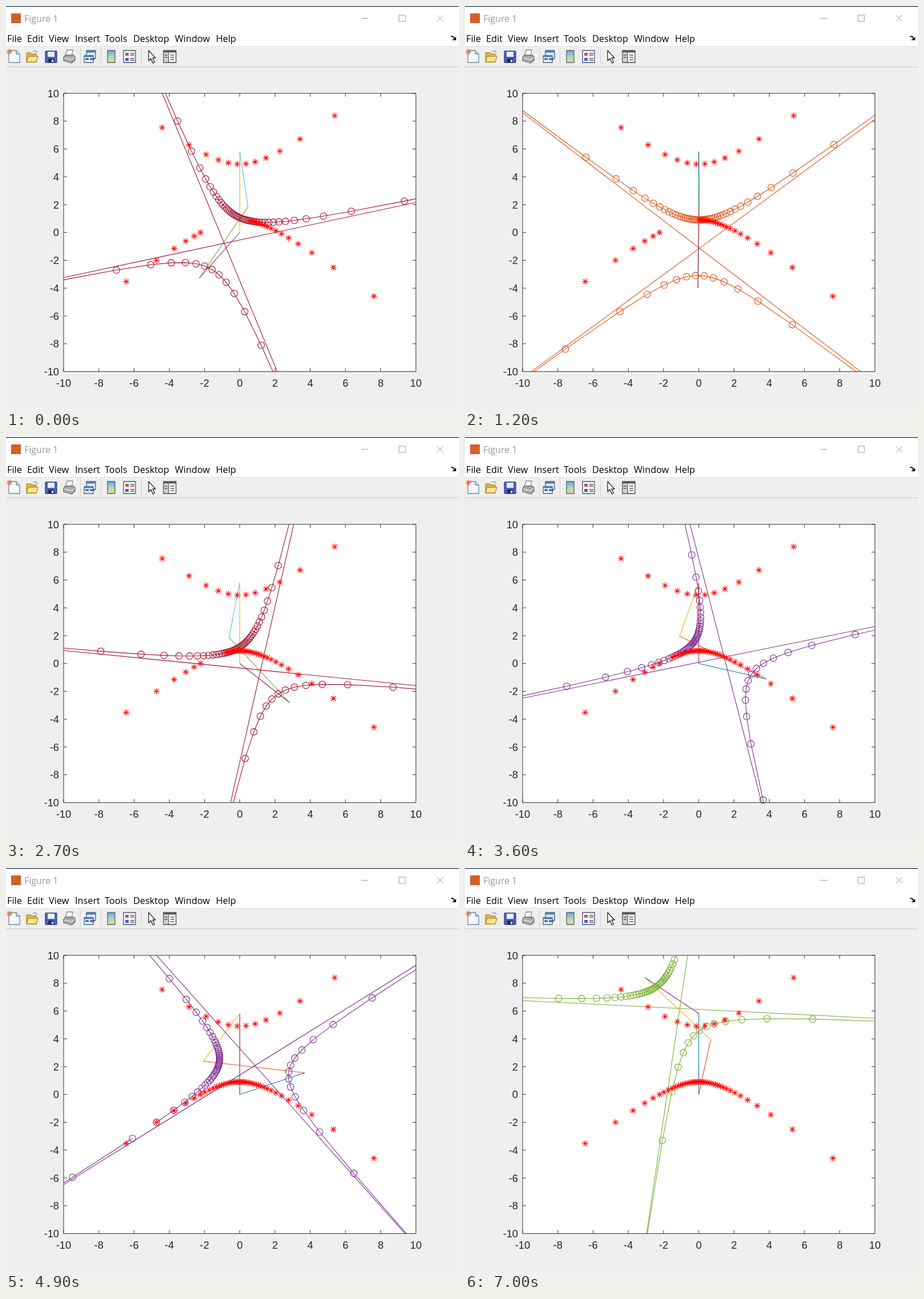
An HTML page that plays this animation: 794x706 px, repeating every 7100 ms.

```html
<!DOCTYPE html>
<html lang="en">
<head>
<meta charset="utf-8">
<title>Figure 1</title>
<style>
html, body { margin: 0; width: 100%; height: 100%; overflow: hidden; background: #efefef; }
svg { display: block; }
.ui { font: 16.3px "Open Sans", "Noto Sans", sans-serif; }
.tick { font: 18.3px "Liberation Sans", Arial, sans-serif; fill: #262626; }
.line { fill: none; stroke-width: 1.1; }
</style>
</head>
<body>
<svg width="794" height="706" viewBox="0 0 794 706">
  <defs>
    <clipPath id="box"><rect x="101" y="153" width="618" height="487.5"/></clipPath>
    <linearGradient id="map" x2="0" y2="1">
      <stop stop-color="#6fa5e0"/><stop offset=".5" stop-color="#a9d6c0"/><stop offset="1" stop-color="#f2dc78"/>
    </linearGradient>
  </defs>
  <rect width="794" height="706" fill="#efefef"/>
  <rect width="794" height="70" fill="#fff"/>
  <path d="M0 .5H794" stroke="#1c2c49" stroke-width="1.5"/>
  <path d="M0 70.5H794" stroke="#e2e2e2"/>
  <path d="M0 106.5H794" stroke="#c9c9c9"/>

  <!-- title bar -->
  <rect x="9" y="13" width="17" height="17" fill="#d2602a"/>
  <text class="ui" x="32" y="28" fill="#999" style="font-size:16px">Figure 1</text>
  <path d="M623 21.5H635M689 16H700V27H689ZM755.5 16L766.5 27M766.5 16L755.5 27" fill="none" stroke="#999"/>
  <g id="menu" class="ui"></g>
  <path d="M780 53C784 53 786 55 786 58" fill="none" stroke="#111" stroke-width="2"/>
  <path d="M789 54V60H782Z" fill="#111"/>

  <!-- toolbar -->
  <path d="M130.5 73V104M166.5 73V104M237.5 73V104" stroke="#d0d0d0"/>
  <g stroke-width="1.3" stroke-linejoin="round">
    <path d="M5 78H18L24 84V99H5Z" fill="#f3f8fd" stroke="#6c87a8"/>
    <path d="M18 78V84H24" fill="#c9dcf0" stroke="#6c87a8"/>
    <path d="M6 75V85M1 80H11M2.5 76.5L9.5 83.5M9.5 76.5L2.5 83.5" stroke="#e07b45" stroke-width="1.6"/>
    <path d="M36 98V82H43L45 84H53V98Z" fill="#e5b74d" stroke="#b58a2c"/>
    <path d="M36 98L39 88H56L53 98Z" fill="#ffe58e" stroke="#b58a2c"/>
    <path d="M47 80Q52 76 55 82" fill="none" stroke="#7d95b0"/>
    <rect x="69" y="79" width="20" height="20" rx="1" fill="#4a5fc0" stroke="#35418d"/>
    <path d="M73 80H85V89H73Z" fill="#e8effb"/>
    <path d="M74 92H84V99H74Z" fill="#222a55"/><path d="M80 94H83V98H80Z" fill="#eee"/>
    <path d="M104 88L107 77H117L115 88Z" fill="#fff" stroke="#8a8a8a"/>
    <path d="M101 90L104 86H118L121 89V95L115 100L101 96Z" fill="#a9a9a9" stroke="#6a6a6a"/>
    <path d="M102 91L115 94L120 90" fill="none" stroke="#e6e6e6"/>
    <rect x="141" y="78" width="16" height="14" fill="#dbe7f4" stroke="#466080"/>
    <path d="M141 80H157" stroke="#4f79ad" stroke-width="3"/>
    <rect x="137" y="87" width="16" height="12" fill="#eef4fa" stroke="#466080"/>
    <path d="M137 88H153" stroke="#4f79ad" stroke-width="3"/>
    <path d="M139 93H145M147 93H155" stroke="#445c78" stroke-width="3"/>
    <rect x="178" y="78" width="13" height="21" fill="url(#map)" stroke="#52627a"/>
    <rect x="206" y="78" width="21" height="21" fill="#f8f9fd" stroke="#46526f"/>
    <rect x="209" y="82" width="6" height="5" fill="#d94d3c"/><rect x="209" y="91" width="6" height="5" fill="#3f5fc9"/>
    <path d="M218 83H225M218 86H225M218 92H225M218 95H225" stroke="#555"/>
    <path d="M250 78V96L254 92L257.500 100L260.500 98.500L257 91H262Z" fill="#fff" stroke="#222"/>
    <rect x="276" y="78" width="22" height="21" fill="#fff" stroke="#444"/>
    <path d="M276 80H298" stroke="#555" stroke-width="3"/>
    <rect x="277" y="82" width="8" height="16" fill="#d4d4d4"/>
    <path d="M285 82V99M288 86H295M288 90H295M288 94H295M278 86H283M278 90H283" stroke="#555"/>
  </g>

  <!-- axes -->
  <rect x="101" y="153" width="617.500" height="487.500" fill="#fff"/>
  <g id="labels" class="tick"></g>
  <g clip-path="url(#box)" id="lines"></g>
  <path id="rings" class="line"/>
  <path id="stars" class="line" stroke="#f00"/>
  <path id="frame" fill="none" stroke="#333"/>
</svg>
<script>
const COLORS = ["#0072bd", "#d95319", "#edb120", "#7e2f8e", "#77ac30", "#4dbeee", "#a2142f"];
const CRANK = 4, GROUND = 5.815;
const LOOP = 7100, STEP_MS = 192, FIRST = 41, COUNT = 63;
const O = [0, 0], P = [0, GROUND];
const $ = id => document.getElementById(id);

function add(parent, tag, attrs, text = "") {
  const el = document.createElementNS("http://www.w3.org/2000/svg", tag);
  for (const key in attrs) el.setAttribute(key, attrs[key]);
  el.textContent = text;
  return $(parent).appendChild(el);
}

const px = x => 409.75 + 30.875 * x;
const py = y => 396.75 - 24.375 * y;
const pixel = ([x, y]) => [px(x).toFixed(2), py(y).toFixed(2)];
const inside = ([x, y]) => Math.abs(x) <= 10 && Math.abs(y) <= 10;
const polyline = pts => "M" + pts.map(p => pixel(p).join(" ")).join("L");
const ring = p => { const [x, y] = pixel(p); return `M${x} ${y}m-5.8 0a5.8 5.8 0 1 0 11.6 0a5.8 5.8 0 1 0-11.6 0`; };
const star = p => {
  const [x, y] = pixel(p);
  return `M${x} ${y}m-5.5 0h11M${x} ${y}m0-5.5v11M${x} ${y}m-4-4l8 8M${x} ${y}m-4 4l8-8`;
};
const polar = (r, a) => [r * Math.cos(a), r * Math.sin(a)];

// Where the lines of the two cranks cross: a point of the fixed hyperbola
const pole = a => polar((GROUND ** 2 - CRANK ** 2) / (2 * GROUND * Math.sin(a) - 2 * CRANK), a);

// The crossed linkage is symmetric about the perpendicular bisector of AP
function mirror(A) {
  const dx = P[0] - A[0], dy = P[1] - A[1], len2 = dx * dx + dy * dy;
  const mx = (P[0] + A[0]) / 2, my = (P[1] + A[1]) / 2;
  return ([x, y]) => {
    const k = 2 * ((x - mx) * dx + (y - my) * dy) / len2;
    return [x - k * dx, y - k * dy];
  };
}

const menu = { File: 2, Edit: 37, View: 75, Insert: 121, Tools: 173, Desktop: 223, Window: 296, Help: 368 };
for (const name in menu) add("menu", "text", { x: menu[name], y: 63 }, name);

let frame = "M101 153H718.5V640.5H101Z";
for (let v = -10; v <= 10; v += 2) {
  add("labels", "text", { x: px(v), y: 667, "text-anchor": "middle" }, v);
  add("labels", "text", { x: 93, y: py(v) + 6.7, "text-anchor": "end" }, v);
  frame += `M${px(v)} 153v6M${px(v)} 640.5v-6M101 ${py(v)}h6M718.5 ${py(v)}h-6`;
}
$("frame").setAttribute("d", frame);
const lines = Array.from({ length: 5 }, () => add("lines", "path", { class: "line" }));

function show(n) {
  const turn = FIRST + n, angle = turn % COUNT / 10;
  const A = polar(CRANK, angle), flip = mirror(A), B = flip(O);
  const curve = Array.from({ length: COUNT }, (_, i) => flip(pole(angle - i / 10)));
  [[O, P], [O, A], [A, B], [B, P], curve].forEach((pts, i) => {
    lines[i].setAttribute("d", polyline(pts));
    lines[i].setAttribute("stroke", COLORS[(2 + 5 * n + i) % 7]);
  });
  $("rings").setAttribute("d", curve.filter(inside).map(ring).join(""));
  $("rings").setAttribute("stroke", COLORS[(6 + 5 * n) % 7]);
  const trail = Array.from({ length: Math.min(turn + 1, COUNT) }, (_, k) => pole(k / 10));
  $("stars").setAttribute("d", trail.filter(inside).map(star).join(""));
}

const start = performance.now();
function tick() {
  const t = (performance.now() - start) % LOOP;
  show(Math.floor(t / STEP_MS + 0.51));
  requestAnimationFrame(tick);
}
tick();
</script>
</body>
</html>
```
